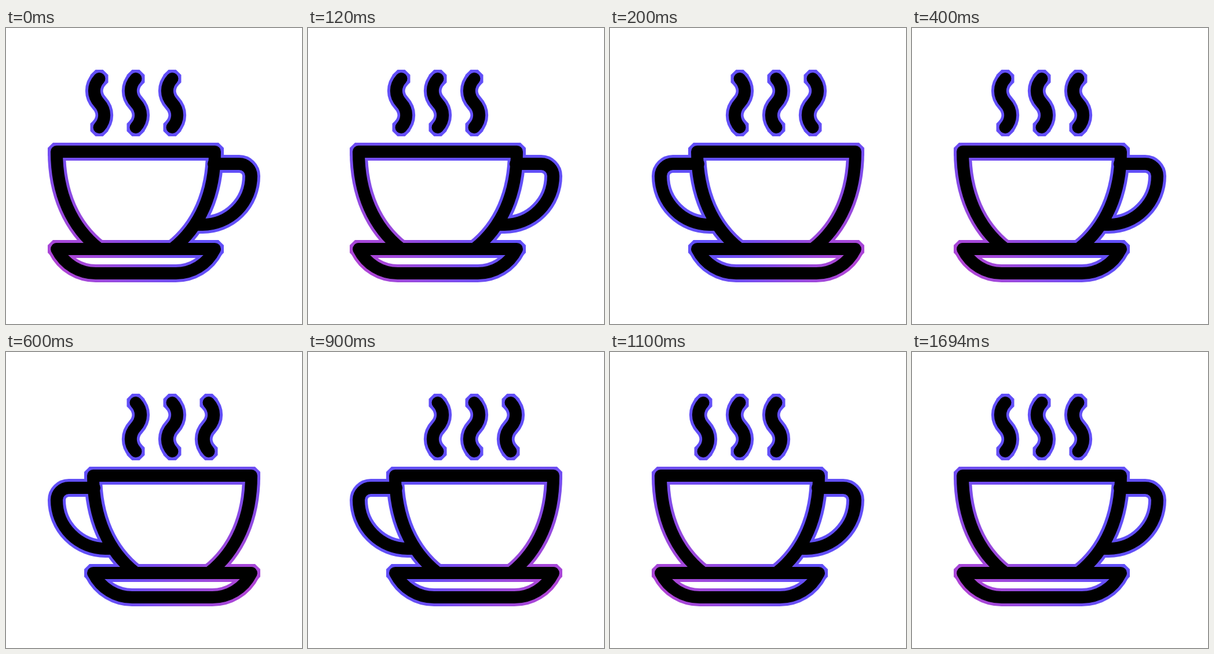
Animation, 511 px wide and 511 px high, one loop 2090 ms. Source, as an HTML page with a canvas:

```html
<!DOCTYPE html>
<html lang="en">
<head>
<meta charset="utf-8">
<title>Coffee cup</title>
<style>
  html, body { margin: 0; width: 100%; height: 100%; overflow: hidden; background: #fff; }
  canvas { display: block; width: 511px; height: 511px; }
</style>
</head>
<body>
<canvas id="stage" width="511" height="511"></canvas>
<script>
const SIZE = 511;
const UNIT = 21;
const ORIGIN = 87.5;
const RIM = 31 / UNIT;
const LOOP = 2090;
const FLIPS = [200, 400, 600, 1100];

const ctx = document.getElementById('stage').getContext('2d');

// Everything is drawn on a 16 x 16 grid, one unit per black line width.
const icon = new Path2D();
const tips = [[0, 6], [13, 6], [0, 14], [13, 14]];

for (const x of [3.5, 6.5, 9.5]) {
  icon.addPath(new Path2D(`M${x} 0c-.55.6-.55 1.4 0 2s.55 1.4 0 2`));
  tips.push([x, 0], [x, 4]);
}
icon.addPath(new Path2D('M3.5 14C1.2 12.2 0 9.4 0 6H13C13 9.4 11.8 12.2 9.5 14'));
icon.addPath(new Path2D('M12.9 7H15A1 1 0 0 1 16 8A4 4 0 0 1 12 12H11.6'));
icon.addPath(new Path2D('M0 14H13C12.35 15.3 11.1 16 9.8 16H3.2C1.9 16 .65 15.3 0 14Z'));

function octagon(cx, cy) {
  const r = RIM / 2 / Math.cos(Math.PI / 8);
  ctx.beginPath();
  for (let i = 0; i < 8; i++) {
    const a = (i + 0.5) * Math.PI / 4;
    ctx.lineTo(cx + r * Math.cos(a), cy + r * Math.sin(a));
  }
  ctx.fill();
}

const glow = ctx.createRadialGradient(-0.2, 15.6, 0, -0.2, 15.6, 12.5);
glow.addColorStop(0, '#b344d4');
glow.addColorStop(0.35, '#9a49dc');
glow.addColorStop(0.75, '#734df0');
glow.addColorStop(1, '#624ff8');

function draw(flipped) {
  ctx.setTransform(1, 0, 0, 1, 0, 0);
  ctx.fillStyle = '#fff';
  ctx.fillRect(0, 0, SIZE, SIZE);
  if (flipped) ctx.setTransform(-1, 0, 0, 1, SIZE, 0);
  ctx.translate(ORIGIN, ORIGIN);
  ctx.scale(UNIT, UNIT);

  ctx.fillStyle = ctx.strokeStyle = glow;
  ctx.lineWidth = RIM;
  ctx.lineCap = 'butt';
  ctx.lineJoin = 'bevel';
  ctx.stroke(icon);
  for (const [x, y] of tips) octagon(x, y);

  ctx.strokeStyle = '#000';
  ctx.lineWidth = 1;
  ctx.lineCap = ctx.lineJoin = 'round';
  ctx.stroke(icon);
}

const start = performance.now();

function tick() {
  const t = (performance.now() - start) % LOOP;
  draw(FLIPS.filter(f => t >= f).length % 2 === 1);
  requestAnimationFrame(tick);
}
tick();
</script>
</body>
</html>
```
